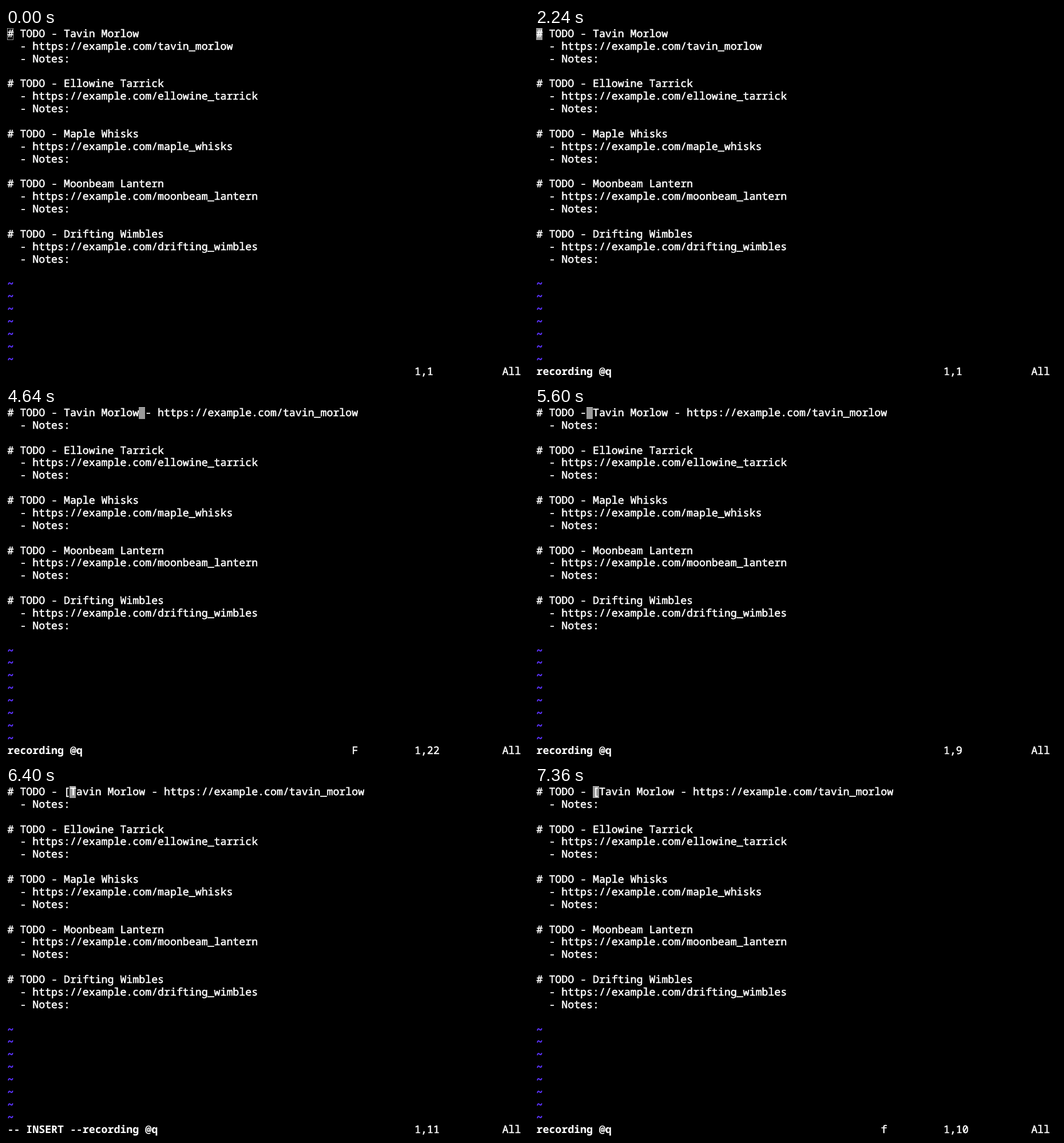
Write an HTML page that moves like this. It is 914 by 613 pixels and loops after 8 s.

```html
<!DOCTYPE html>
<html lang="en">
<head>
<meta charset="utf-8">
<title>Editor macro</title>
<style>
  html, body { margin: 0; width: 100%; height: 100%; overflow: hidden; background: #000; }
  #screen {
    position: relative; width: 914px; height: 613px; overflow: hidden; background: #000; color: #fff;
    font: 500 18.24px "Noto Sans Mono", "DejaVu Sans Mono", monospace;
    font-variant-ligatures: none; text-rendering: geometricPrecision;
    -webkit-text-stroke: 0.55px currentColor;
  }
  #screen div { position: absolute; white-space: pre; line-height: 21.87px; height: 21.87px; }
  #screen .tilde { color: #5c33ff; -webkit-text-stroke-width: 0.9px; }
  #screen .mode { font-weight: 700; -webkit-text-stroke-width: 0.1px; }
  #screen #cursor { width: 11px; height: 21px; box-sizing: border-box; background: #999; }
  #screen #cursor.hollow { background: none; border: 1px solid #999; }
</style>
</head>
<body>
<div id="screen"><div id="cursor"></div></div>
<script>
const CELL = 10.945, LINE = 21.87, LEFT = 2.5, STATUS = 27, LOOP = 8000;
const screen = document.getElementById('screen');
const cursor = document.getElementById('cursor');

const people = ['Tavin Morlow', 'Ellowine Tarrick', 'Maple Whisks', 'Moonbeam Lantern', 'Drifting Wimbles'];
const entry = name => [
  '# TODO - ' + name,
  '  - https://example.com/' + name.toLowerCase().replace(' ', '_'),
  '  - Notes:',
  ''
];
const plain = people.flatMap(entry);
const joined = [plain[0] + ' ' + plain[1].trim(), ...plain.slice(2)];
const opened = [joined[0].replace('- ', '- ['), ...joined.slice(1)];

// Each step changes only the listed parts of the editor state.
const steps = [
  [0,    { lines: plain, col: 0, shape: 'hollow', mode: '', keys: '', ruler: '1,1', extent: 'All' }],
  [320,  { shape: 'block' }],
  [2080, { keys: 'q' }],
  [2240, { keys: '', mode: 'recording @q' }],
  [3200, { lines: joined, col: 21, ruler: '1,22' }],
  [4640, { keys: 'F' }],
  [4800, { keys: '', col: 7, ruler: '1,8' }],
  [5600, { col: 8, ruler: '1,9' }],
  [6080, { mode: '-- INSERT --recording @q', col: 9, ruler: '1,10' }],
  [6400, { lines: opened, col: 10, ruler: '1,11' }],
  [6880, { mode: 'recording @q', shape: 'none', col: 9, ruler: '', extent: '' }],
  [7040, { shape: 'block', ruler: '1,10', extent: 'All' }],
  [7360, { keys: 'f' }]
];

function addText(row, col, cls = '') {
  const el = document.createElement('div');
  el.className = cls;
  el.style.left = LEFT + col * CELL + 'px';
  el.style.top = row * LINE + 'px';
  screen.append(el);
  return el;
}

const rows = Array.from({ length: STATUS }, (_, i) => addText(i, 0));
const status = {
  mode: addText(STATUS, 0, 'mode'),
  keys: addText(STATUS, 55),
  ruler: addText(STATUS, 65),
  extent: addText(STATUS, 79)
};

let shown = -1;
function draw(index) {
  const state = Object.assign({}, ...steps.slice(0, index + 1).map(step => step[1]));
  rows.forEach((el, i) => {
    const filled = i < state.lines.length;
    el.textContent = filled ? state.lines[i] : '~';
    el.className = filled ? '' : 'tilde';
  });
  for (const part in status) status[part].textContent = state[part];
  cursor.className = state.shape;
  cursor.style.display = state.shape === 'none' ? 'none' : 'block';
  cursor.style.left = Math.floor(LEFT + state.col * CELL) + 'px';
  cursor.style.top = 0;
}

function tick() {
  const time = performance.now() % LOOP;
  const index = steps.findLastIndex(step => step[0] <= time);
  if (index !== shown) draw(shown = index);
  requestAnimationFrame(tick);
}
tick();
</script>
</body>
</html>
```
